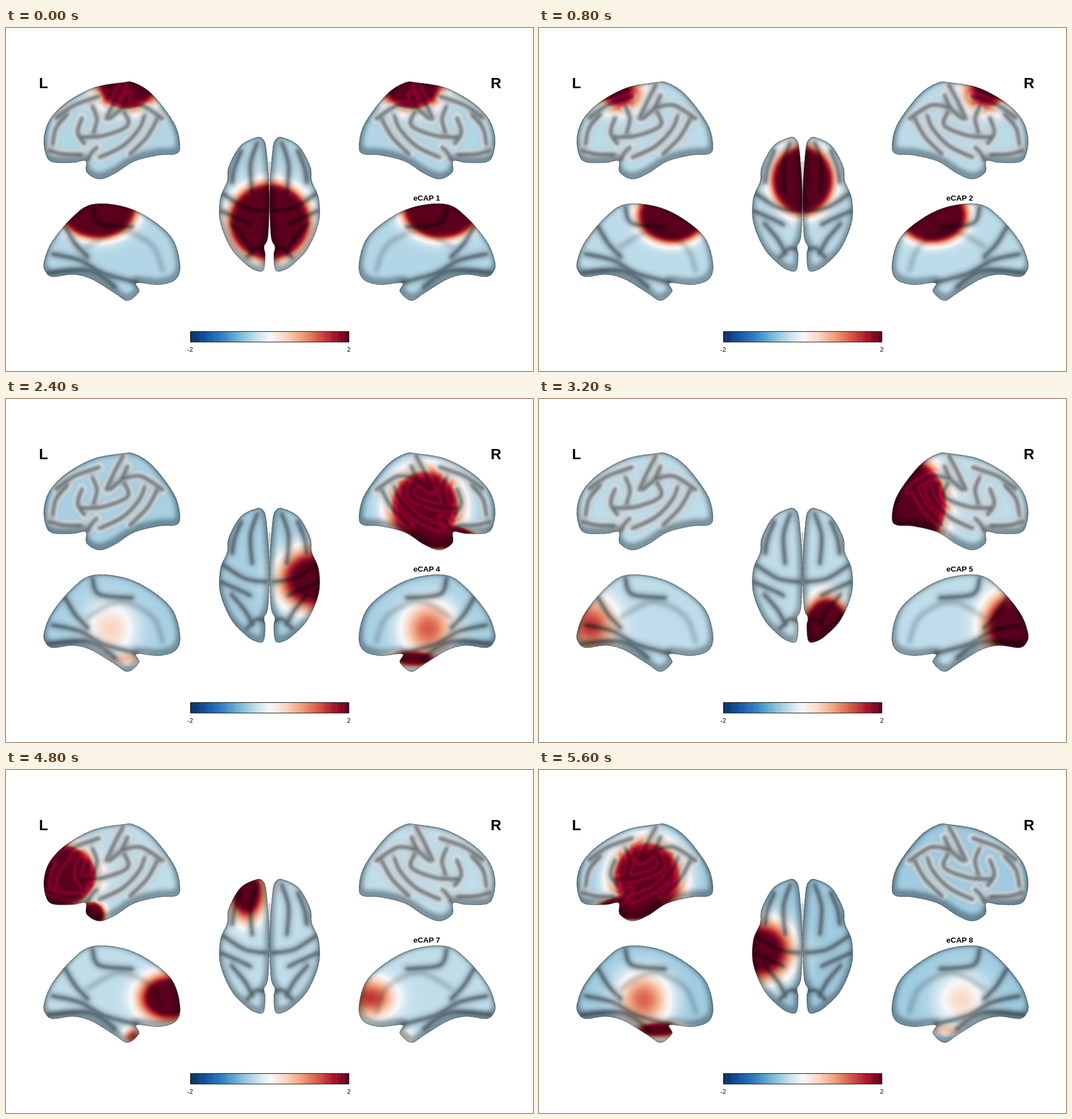
Write an HTML page that moves like this. It is 927 px wide and 604 px high and loops after 6.4 s.

```html
<!DOCTYPE html>
<html lang="en">
<head>
<meta charset="utf-8">
<title>Activation maps</title>
<style>
  html, body { margin: 0; width: 100%; height: 100%; overflow: hidden; background: #fff; }
  svg { display: block; width: 927px; height: 604px; }
  path { fill: none; stroke-linecap: round; stroke-linejoin: round; }
  .shade { mix-blend-mode: multiply; stroke: #3f4b52; }
  .glow { mix-blend-mode: overlay; stroke: #fff; }
  .field ellipse { mix-blend-mode: lighten; }
  text { font-family: Arial, "Liberation Sans", sans-serif; text-anchor: middle; fill: #000; }
  .side { font-size: 26px; font-weight: bold; }
  .name { font-size: 13.5px; font-weight: bold; }
  .tick { font-size: 11px; }
</style>
</head>
<body>
<svg id="stage" viewBox="0 0 927 604"></svg>
<script>
const W = 927, H = 604, HOLD = 800, MID = 463.5;

// Diverging colours, evenly spaced from -2 to 2.
const RAMP = ["#053064", "#1854a4", "#3180be", "#75b4d4", "#bcdbe9", "#f7f8fa",
  "#fbd6c3", "#f0a07d", "#d65c4b", "#ac182c", "#5c001c"]
  .map(c => [1, 3, 5].map(i => parseInt(c.slice(i, i + 2), 16)));

function ramp(t) {
  const p = Math.min(9.999, t * 10), i = Math.floor(p);
  return `rgb(${RAMP[i].map((a, k) => Math.round(a + (RAMP[i + 1][k] - a) * (p - i)))})`;
}

// Smooth curve through "x,y x,y ..." points.
function curve(text, closed) {
  const p = text.trim().split(/\s+/).map(s => s.split(",").map(Number)), n = p.length;
  const at = i => p[closed ? (i + n) % n : Math.max(0, Math.min(n - 1, i))];
  let d = `M${p[0]}`;
  for (let i = 0; i < (closed ? n : n - 1); i++) {
    const [a, b, c, e] = [-1, 0, 1, 2].map(k => at(i + k));
    d += `C${b.map((v, k) => v + (c[k] - a[k]) / 6)} ${c.map((v, k) => v - (e[k] - b[k]) / 6)} ${c}`;
  }
  return d + (closed ? "Z" : "");
}

// Each view places brain coordinates (x back, y down, s sideways from the midline)
// on the page; gap is how far a focus lies from the visible surface.
// Shapes are for the left side, the right side is mirrored.
const VIEWS = [
  {
    outline: `67,192 78,160 108,130 155,105 205,96 224,96 252,112 280,144 300,177 306,210 298,222
      268,224 225,235 192,256 164,266 142,254 140,234 118,237 82,236 70,222`,
    folds: `132,192 170,190 214,172 208,148|164,228 205,208 234,178 244,154|218,222 248,192 266,160
      |152,138 160,160 154,184|206,100 192,126 176,160|214,118 202,142 182,160|108,152 88,176 82,205
      |134,158 126,184 138,204|88,158 120,136 164,120|206,140 238,136 276,160|144,232 150,220 160,210
      |76,216 100,222 132,223`,
    glow: .85, edge: .55,
    place: f => [f.x, f.y, f.rx, f.ry],
    gap: f => (f.s - 45) / f.rs
  },
  {
    outline: `67,412 80,378 114,336 150,311 205,314 252,335 292,370 306,415 299,442 270,452 230,449
      234,464 214,480 190,466 150,442 118,434 82,438 69,428`,
    folds: `104,350 122,380 144,403|152,316 164,344 222,350|82,398 130,409 172,432 230,448
      |74,431 136,426 166,436 192,456`,
    soft: "142,386 200,357 256,382 276,428",
    glow: .12, edge: .5,
    place: f => [374 - f.x, f.y + 215, f.rx, f.ry],
    gap: f => (f.s - 5) / f.rs
  },
  {
    outline: `452,196 440,193 412,208 392,244 389,270 377,300 377,342 396,388 422,416 440,427 453,426
      456,400 454,385 461,365 463,290 458,215`,
    folds: `442,202 430,240 433,290|414,216 402,246 398,272|382,292 420,316 458,322|378,322 410,336 430,346
      |396,344 420,372 434,398|424,404 440,388 454,390`,
    glow: .2, edge: .5,
    place: f => [MID - f.s, f.x + 128, f.rs, f.rx],
    gap: f => Math.max(0, f.y - 140) / f.ry
  }
];

// Centre x y s, spreads rx ry rs, strength.
const focus = (x, y, s, rx, ry, rs, peak) => ({ x, y, s, rx, ry, rs, peak });
const FOCI = {
  centre: [focus(213, 104, 0, 55, 42, 58, 2.3)],
  upper: [focus(140, 115, 0, 50, 40, 45, 2)],
  front: [focus(88, 186, 40, 58, 46, 38, 2.4), focus(150, 255, 40, 22, 22, 35, 1.2)],
  temple: [focus(190, 190, 75, 60, 64, 65, 1.5), focus(165, 242, 40, 50, 18, 35, 2.4)],
  back: [focus(283, 185, 42, 60, 66, 40, 2.3)]
};

// Region, side (0 left, 1 right; the midline regions light up both), resting level.
const STATES = [
  ["centre", 0, .39], ["upper", 0, .4], ["front", 1, .408], ["temple", 1, .373],
  ["back", 1, .405], ["back", 0, .405], ["front", 0, .408], ["temple", 0, .36]
];

const grey = t => `rgb(${Array(3).fill(Math.round(Math.min(1, t) * 255))})`;

// One focus as an ellipse whose level falls off with distance in all three directions.
function spot(f, view, rest, id) {
  const [x, y, rx, ry] = view.place(f), gap = view.gap(f), steps = 16, reach = 2;
  let stops = "";
  for (let i = 0; i <= steps; i++) {
    const r = reach * i / steps;
    const rise = i < steps ? f.peak * Math.exp(-Math.pow(r * r + gap * gap, 1.5)) : 0;
    stops += `<stop offset="${i / steps}" stop-color="${grey(rest + rise)}"/>`;
  }
  return `<radialGradient id="${id}">${stops}</radialGradient>
    <ellipse cx="${x}" cy="${y}" rx="${rx * reach}" ry="${ry * reach}" fill="url(#${id})"/>`;
}

const filter = (id, body) => `<filter id="${id}" filterUnits="userSpaceOnUse" x="0" y="0" width="${W}" height="${H}"
  color-interpolation-filters="sRGB">${body}</filter>`;
const blur = n => filter("blur" + n, `<feGaussianBlur stdDeviation="${n}"/>`);
const line = (d, width, soft, alpha) =>
  `<path d="${d}" stroke-width="${width}" filter="url(#blur${soft})" opacity="${alpha}"/>`;

function defs() {
  const tables = ["R", "G", "B"].map((c, k) =>
    `<feFunc${c} type="table" tableValues="${RAMP.map(r => r[k] / 255).join(" ")}"/>`).join("");
  return `<defs>${[1, 2, 4, 6].map(blur).join("")}
    ${filter("heat", `<feGaussianBlur stdDeviation="2"/><feComponentTransfer>${tables}</feComponentTransfer>`)}</defs>`;
}

function brain(view, side, id) {
  const d = curve(view.outline, true), folds = view.folds.split("|").map(s => curve(s)).join("");
  return `<g${side ? ` transform="matrix(-1 0 0 1 ${2 * MID} 0)"` : ""}>
    <clipPath id="clip${id}"><path d="${d}"/></clipPath>
    <g clip-path="url(#clip${id})">
      <g class="field" id="field${id}" filter="url(#heat)"></g>
      <g class="glow">${line(folds, 17, 2, view.glow)}</g>
      <g class="shade">
        ${line(folds, 11, 4, .5)}
        ${line(folds, 4, 2, .6)}
        ${view.soft ? line(curve(view.soft), 6, 4, .4) : ""}
        <g transform="translate(-1 -5)">${line(d, 12, 4, view.edge)}</g>
        ${line(d, 3, 1, .4)}
      </g>
    </g>
    <path d="${d}" stroke="#34424a" stroke-width=".8" stroke-dasharray="5 2 2 1" opacity=".7"/>
  </g>`;
}

function colourBar() {
  const x = 325, y = 535, w = 278, h = 18, bands = 64;
  let out = "";
  for (let k = 0; k < bands; k++) {
    out += `<rect x="${x + k * w / bands}" y="${y}" width="${w / bands + .4}" height="${h}" fill="${ramp((k + .5) / bands)}"/>`;
  }
  return out + `<rect x="${x - .5}" y="${y - .5}" width="${w + .5}" height="${h + .5}" fill="none" stroke="#111"/>
    <text class="tick" x="324" y="570">-2</text><text class="tick" x="603" y="570">2</text>`;
}

const parts = VIEWS.flatMap((view, i) => [0, 1].map(side => ({ view, side, id: `${i}${side}` })));

document.getElementById("stage").innerHTML = `${defs()}<rect width="${W}" height="${H}" fill="#fff"/>
  <path d="M${MID} 236V326" stroke="#cfd1d2" stroke-width="4"/>
  ${parts.map(p => brain(p.view, p.side, p.id)).join("")}${colourBar()}
  <text class="side" x="66" y="106">L</text><text class="side" x="862" y="106">R</text>
  <text class="name" id="name" x="740" y="304"></text>`;

let shown = -1;
function update(time) {
  const k = Math.floor(time / HOLD) % STATES.length;
  if (k === shown) return;
  shown = k;
  const [region, home, rest] = STATES[k];
  document.getElementById("name").textContent = `eCAP ${k + 1}`;
  for (const { view, side, id } of parts) {
    // Seen from the other hemisphere, a focus lies beyond the midline.
    const spots = FOCI[region].map((f, j) =>
      spot(side === home ? f : { ...f, s: -f.s }, view, rest, `spot${id}${j}`));
    document.getElementById("field" + id).innerHTML =
      `<rect width="${W}" height="${H}" fill="${grey(rest)}"/>${spots.join("")}`;
  }
}

const start = performance.now();
function tick() {
  update(performance.now() - start);
  requestAnimationFrame(tick);
}
update(0);
requestAnimationFrame(tick);
</script>
</body>
</html>
```
